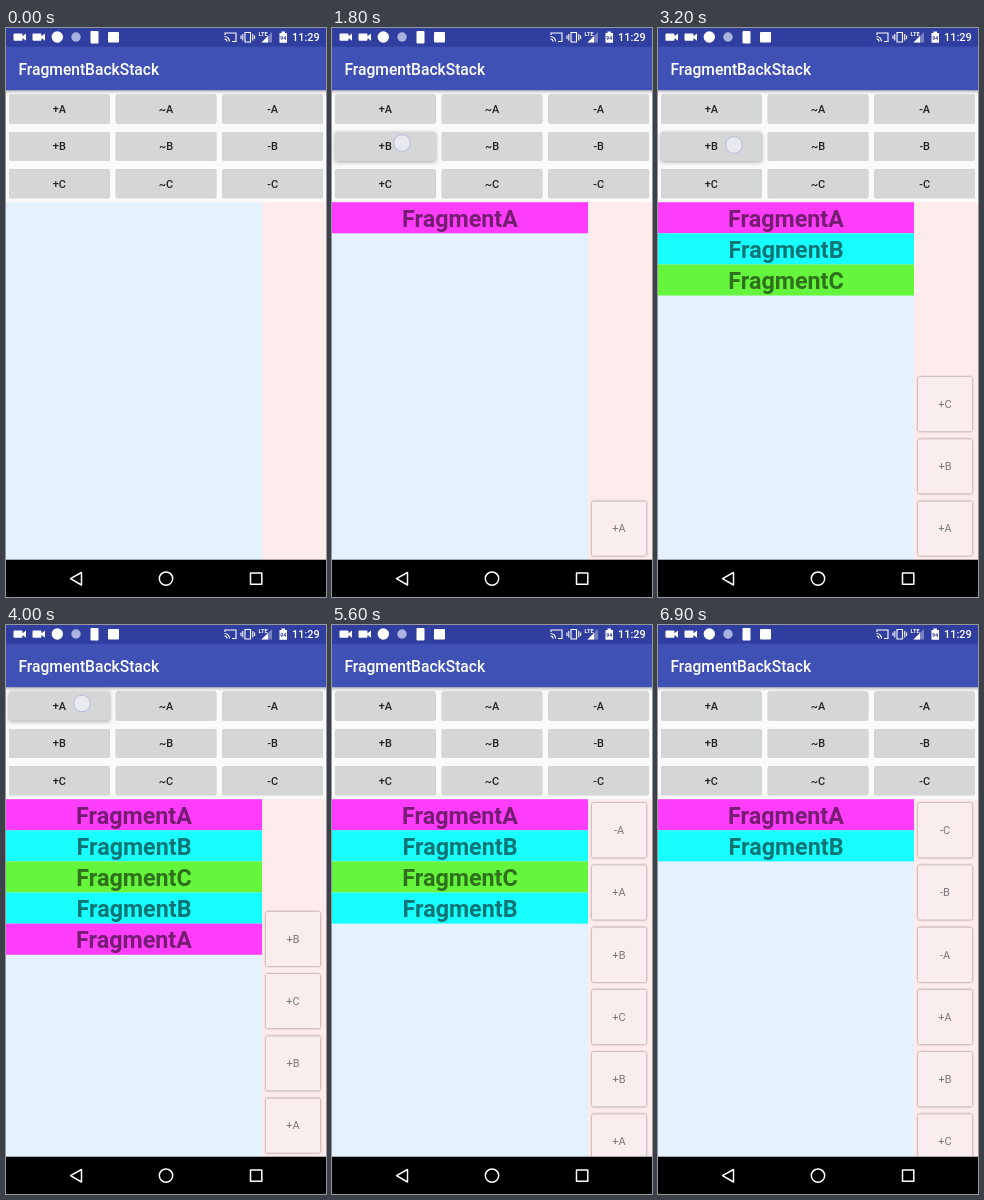
Recreate the animation shown at these times as an HTML page. Size 320x569 px, loop 8 s.

```html
<!DOCTYPE html>
<html lang="en">
<head>
<meta charset="utf-8">
<title>Fragment back stack</title>
<style>
  html, body { margin: 0; width: 100%; height: 100%; overflow: hidden; background: #fafafa; }
  svg { display: block; width: 320px; height: 569px; font-family: Roboto, "Noto Sans", sans-serif; }
  .mid { text-anchor: middle; }
  .key { fill: #d5d6d6; filter: drop-shadow(0 .6px .6px rgba(0,0,0,.3)); }
  .label { font-size: 10.9px; font-weight: 500; fill: #202020; }
  .band { font-size: 23.3px; font-weight: 700; fill: rgba(0,0,0,.54); }
  .card { fill: #faeded; filter: drop-shadow(0 .4px 1.2px rgba(0,0,0,.55)); }
  .step { font-size: 10.9px; fill: #777; }
  .line { fill: none; stroke: #fff; stroke-width: 1.5; stroke-linejoin: round; }
  .thin { fill: none; stroke: #fff; stroke-width: 1.1; }
</style>
</head>
<body>
<svg viewBox="0 0 320 569">
  <defs>
    <linearGradient id="shade" x2="0" y2="1">
      <stop stop-color="#000" stop-opacity=".25"/>
      <stop offset="1" stop-color="#000" stop-opacity="0"/>
    </linearGradient>
    <clipPath id="pane"><rect x="256" y="174.2" width="64" height="357.5"/></clipPath>
  </defs>
  <rect width="320" height="569" fill="#fafafa"/>
  <rect y="62" width="320" height="4" fill="url(#shade)"/>
  <rect width="320" height="62.2" fill="#3f51b5"/>
  <rect width="320" height="18.7" fill="#303f9f"/>
  <text x="12.4" y="46.5" font-size="15.6" font-weight="500" fill="#fff">FragmentBackStack</text>

  <g fill="#fff">
    <path id="camera" d="M8.5 5.5h7a1 1 0 0 1 1 1v1.7l3.5-2.7v7.3l-3.5-2.7v1.7a1 1 0 0 1-1 1h-7a1 1 0 0 1-1-1v-5.300a1 1 0 0 1 1-1z"/>
    <use href="#camera" x="19"/>
    <circle cx="51.300" cy="9" r="5.700"/>
    <circle cx="70" cy="9" r="4.700" fill="#a9b3e0"/>
    <rect x="84.500" y="3" width="8" height="12.500" rx="1"/>
    <rect x="102" y="4" width="11" height="10.500" rx="1"/>
    <path class="thin" d="M219 7V5h11v8.500h-4M218.500 8.500a5 5 0 0 1 5 5M218.500 11a2.500 2.500 0 0 1 2.500 2.500"/>
    <path class="thin" d="M239 4.500h5.500v9.500h-5.500zM236.800 6v6.500M246.800 6v6.500M235 7.500v3.500M248.600 7.500v3.500"/>
    <text x="252.500" y="8.300" font-size="5.600" font-weight="700">LTE</text>
    <path d="M255.500 14.500L266 4v10.500z" opacity=".35"/>
    <path d="M255.500 14.500L262 8v6.500z"/>
    <path d="M273.500 5h2v-1.500h3.500V5h2v9.800h-7.500z"/>
    <text class="mid" x="277.200" y="12" font-size="5" font-weight="700" fill="#303f9f">94</text>
    <text x="286" y="13.200" font-size="10.900" font-weight="500">11:29</text>
  </g>

  <rect y="174.2" width="256" height="357.5" fill="#e4f1fe"/>
  <rect x="256" y="174.2" width="64" height="357.5" fill="#feebec"/>
  <g id="keys"></g>
  <g id="bands"></g>
  <g id="cards" clip-path="url(#pane)"></g>
  <g id="touch"></g>

  <rect y="531.7" width="320" height="38" fill="#000"/>
  <path class="line" d="M75.500 544.500v12.500L64.500 550.700z"/>
  <circle class="line" cx="160" cy="550.600" r="6.700"/>
  <rect class="line" x="244.500" y="545" width="11.300" height="11.300"/>
</svg>
<script>
const LOOP = 8000, TOP = 174.2, BOTTOM = 531.7, PITCH = 62.22, BAND = 31.11;
const COLORS = { A: '#ff3dfa', B: '#18ffff', C: '#64f53c' };
const OPS = '+~-', NAMES = 'ABC';

// Finger down, moment of effect, command, finger position
const taps = [
  [900, 1000, '+A', 72, 80],
  [1800, 1900, '+B', 70, 115],
  [2500, 2600, '+C', 73, 154],
  [3100, 3300, '+B', 76, 117],
  [3900, 4000, '+A', 76, 78.5],
  [5100, 5200, '-A', 275, 83],
  [5700, 5900, '-B', 274, 119],
  [6500, 6600, '-C', 273, 156]
];

const put = (id, markup) => document.getElementById(id).innerHTML = markup;
const ramp = (t, from, to) => Math.min(1, Math.max(0, (t - from) / (to - from)));
const ease = p => p * p * (3 - 2 * p);
const text = (kind, x, y, s) => `<text class="mid ${kind}" x="${x}" y="${y}">${s}</text>`;

// Cards rest on the bottom until the pane is full, then the newest stays on top
const slot = (i, n) => Math.max(TOP, BOTTOM - PITCH * n) + PITCH * (n - 1 - i);

function drawKeys(t) {
  let out = '';
  for (const [row, name] of [...NAMES].entries())
    for (const [col, op] of [...OPS].entries()) {
      const x = 320 / 3 * col, y = 62.2 + 37.33 * row;
      let lift = 0;
      for (const [down, act, cmd] of taps)
        if (cmd === op + name && t >= down) lift = Math.max(lift, 1 - ramp(t, act + 50, act + 250));
      const style = lift ? ` style="filter:drop-shadow(0 ${.6 + lift}px ${.6 + 1.6 * lift}px rgba(0,0,0,.35))"` : '';
      out += `<rect class="key" x="${x + 3.1}" y="${y + 4.4}" width="100.5" height="29" rx="1.6"${style}/>`
        + text('label', x + 53.33, y + 22.8, op + name);
    }
  put('keys', out);
}

function draw(t) {
  const bands = [], done = taps.filter(tap => t >= tap[1]);
  for (const [, , [op, name]] of done)
    if (op === '+') bands.push(name);
    else bands.splice(bands.lastIndexOf(name), 1);

  drawKeys(t);
  put('bands', bands.map((name, i) => {
    const y = TOP + BAND * i;
    return `<rect y="${y}" width="256" height="${BAND}" fill="${COLORS[name]}"/>`
      + text('band', 128, y + 24.6, 'Fragment' + name);
  }).join(''));

  const n = done.length, since = n ? t - done[n - 1][1] : 0;
  const slide = ease(ramp(since, 0, 200)), fade = ramp(since, 180, 300);
  put('cards', done.map(([, , cmd], i) => {
    const last = i === n - 1, end = slot(i, n);
    const y = last ? end : slot(i, n - 1) + (end - slot(i, n - 1)) * slide;
    return `<g opacity="${last ? fade : 1}"><rect class="card" x="260" y="${y + 3.9}" width="54.2" height="54.4" rx="1.6"/>`
      + text('step', 287, y + 35, cmd) + '</g>';
  }).join(''));

  const finger = taps.find(([down, act]) => t >= down && t < act + 60);
  put('touch', finger
    ? `<circle cx="${finger[3]}" cy="${finger[4]}" r="8.3" fill="#eeeef6" fill-opacity=".8" stroke="#b4bedd" stroke-width="1"/>`
    : '');
}

const start = performance.now();
function tick() {
  draw((performance.now() - start) % LOOP);
  requestAnimationFrame(tick);
}
tick();
</script>
</body>
</html>
```
